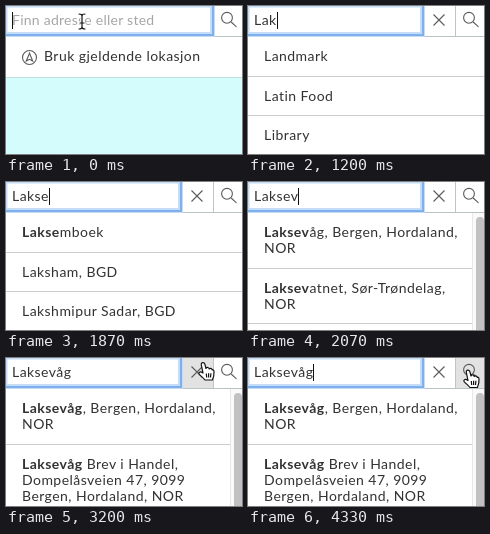
Recreate the animation shown at these times as an HTML page. Size 236 by 148 pixels, loop 4.54 s.

```html
<!DOCTYPE html>
<html lang="nb">
<head>
<meta charset="utf-8">
<style>
html, body { margin: 0; width: 100%; height: 100%; overflow: hidden; background: #d5fcfd; }
svg { display: block; font: 14px Lato, "Open Sans", sans-serif; letter-spacing: .45px; fill: #323232; }
text { white-space: pre; }
.bold { font-weight: 700; }
.line { fill: none; stroke: #5a5a5a; stroke-width: 1.1; }
.rule { stroke: #cdcdcd; }
#hint { letter-spacing: .25px; fill: #a6a6a6; }
</style>
</head>
<body>
<svg width="236" height="148" viewBox="0 0 236 148">
  <g id="list"></g>
  <g id="locate">
    <rect y="30" width="236" height="42" fill="#bfe0e1"/>
    <rect y="30" width="236" height="41" fill="#fff"/>
    <circle cx="23.5" cy="51.5" r="7" class="line"/>
    <path d="M20.3 55 23.5 47.3 26.7 55 23.5 53.3Z" class="line"/>
    <text x="38" y="55">Bruk gjeldende lokasjon</text>
  </g>
  <g id="bar">
    <rect x="224" y="30" width="12" height="118" fill="#fafafa"/>
    <path d="M224.5 30V148" stroke="#e8e8e8"/>
    <rect x="228" y="35" width="8" height="120" rx="4" fill="#c1c1c1"/>
  </g>
  <rect y="30" width="236" height="1" fill="#b9c3c4"/>
  <rect width="236" height="30" fill="#fff"/>
  <rect id="hover" y="0" width="31" height="30" fill="#e2e2e2"/>
  <path d="M207.5 0V30" stroke="#c4c4c4"/>
  <g fill="none">
    <rect id="glow" x="-1" y="-1" height="29.5" stroke="#c3dcf8" stroke-width="5"/>
    <rect id="ring" x="-1" y="-1" height="30" stroke="#7fb0ec" stroke-width="2"/>
  </g>
  <path id="clear" d="M185.5 8.5 196.5 19.5M196.5 8.5 185.5 19.5" class="line"/>
  <path d="M225.2 16 230.5 20.8" class="line"/>
  <circle cx="221" cy="11.8" r="5.4" class="line"/>
  <text id="hint" x="6" y="19">Finn adresse eller sted</text>
  <text id="query" x="6" y="19"></text>
  <rect id="caret" y="6" width="1" height="17" fill="#111"/>
  <g id="beam" fill="none" stroke-linecap="round">
    <path d="M-3-7Q0-7 0-5Q0-7 3-7M0-5V6M-3 8Q0 8 0 6Q0 8 3 8M-2 2H2" stroke="#fff" stroke-width="3"/>
    <path d="M-3-7Q0-7 0-5Q0-7 3-7M0-5V6M-3 8Q0 8 0 6Q0 8 3 8M-2 2H2" stroke="#111" stroke-width="1.2"/>
  </g>
  <g id="hand" stroke="#111" stroke-width="1.2" stroke-linejoin="round">
    <path fill="#fff" d="M5 11 3.3 2.8Q3.1.8 4.7.7T6.9 2.3L8 6.5Q8.4 5.2 9.8 5.5T11.2 7Q12 6 13.2 6.6T14.2 8Q15.8 7.5 16 9.3Q16.3 14 14.4 18H7Q5.4 16 1.5 12.6Q.2 11 1.5 10.2T5 11Z"/>
    <path fill="none" d="M8.3 11.5 8.7 15.5M10.6 11.3V15.5M12.9 11.2 12.5 15.5"/>
  </g>
</svg>
<script>
const LOOP = 4540;
const el = id => document.getElementById(id);
const show = (id, on) => el(id).style.display = on ? "" : "none";
const move = (id, x, y) => el(id).setAttribute("transform", `translate(${x} ${y})`);

// [start, value]
const keys = [[0, ""], [730, "L"], [870, "La"], [1130, "Lak"], [1270, "Laks"], [1470, "Lakse"],
  [1930, "Laksev"], [2130, "Laksevå"], [2330, "Laksevåg"]];
const lists = [
  [0, []],
  [1000, ["Landmark", "Latin Food", "Library"]],
  [1530, ["Laksemboek", "Laksham, BGD", "Lakshmipur Sadar, BGD"]],
  [2070, ["Laksevåg, Bergen, Hordaland,|NOR", "Laksevatnet, Sør-Trøndelag,|NOR"]],
  [2670, ["Laksevåg, Bergen, Hordaland,|NOR",
    "Laksevåg Brev i Handel,|Dompelåsveien 47, 9099|Bergen, Hordaland, NOR"]]
];
// [time, x, y] of the pointer
const path = [[2670, 76, 15], [3130, 192, 4], [3200, 192, 4], [3600, 215, 11.5], [LOOP, 215, 11.5]];

const at = (track, t) => track.filter(k => k[0] <= t).pop();

function pointer(t) {
  const i = Math.max(1, path.findIndex(k => k[0] > t));
  const [t0, x0, y0] = path[i - 1], [t1, x1, y1] = path[i];
  const p = Math.max(0, (t - t0) / (t1 - t0)), e = p * p * (3 - 2 * p);
  return [x0 + (x1 - x0) * e, y0 + (y1 - y0) * e];
}

function rows(items, query) {
  let y = 30.5;
  let out = items.length ? '<rect y="30" width="236" height="118" fill="#fff"/>' : "";
  for (const item of items) {
    const lines = item.split("|");
    lines.forEach((s, i) => {
      const n = i === 0 && s.startsWith(query) ? query.length : 0;
      out += `<text x="16" y="${y + 24.5 + 16 * i}"><tspan class="bold">${s.slice(0, n)}</tspan>${s.slice(n)}</text>`;
    });
    y += 23.5 + 16 * lines.length;
    const edge = Math.floor(y) + .5;
    out += `<path class="rule" d="M0 ${edge}H236"/>`;
  }
  return out;
}

let last;
function draw(t) {
  const [typed, query] = at(keys, t), items = at(lists, t)[1];
  const html = rows(items, query);
  if (html !== last) el("list").innerHTML = last = html;

  const right = query ? 175 : 207;
  el("glow").setAttribute("width", right + .5);
  el("ring").setAttribute("width", right + 1);
  el("query").textContent = query;
  show("hint", !query);
  show("locate", !query);
  show("clear", query);
  show("bar", t >= 2070);

  const blink = query ? (t - typed) % 1000 < 500 : t < 270;
  show("caret", blink);
  const width = query ? el("query").getComputedTextLength() : 0;
  el("caret").setAttribute("x", Math.round(6 + width));

  const [x, y] = pointer(t), moving = t >= 2670, onButton = moving && x > 172;
  show("hand", onButton);
  show("beam", !query || moving && !onButton);
  move("hand", x, y);
  move("beam", x, y);
  show("hover", onButton);
  el("hover").setAttribute("x", x > 203 ? 208 : 176);
}

function tick(now) {
  draw(now % LOOP);
  requestAnimationFrame(tick);
}
draw(0);
requestAnimationFrame(tick);
</script>
</body>
</html>
```
